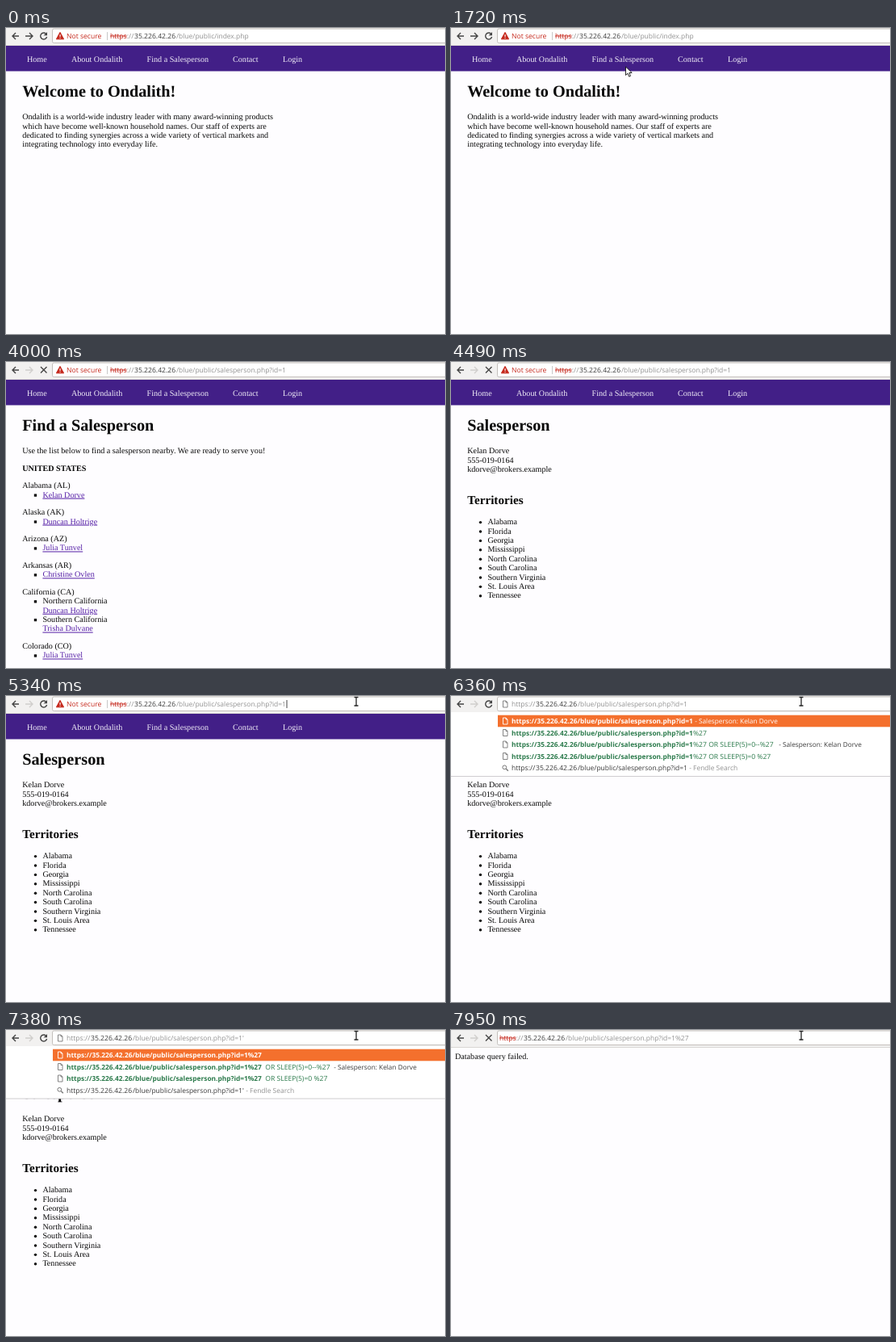
Write an HTML page that moves like this. It is 544 px wide and 379 px high and loops after 8000 ms.

```html
<!DOCTYPE html>
<html lang="en">
<head>
<meta charset="utf-8">
<title>Find a Salesperson</title>
<style>
  html, body { margin: 0; width: 100%; height: 100%; overflow: hidden; background: #fefdff; }
  svg { display: block; width: 544px; height: 379px; }
  text { white-space: pre; text-rendering: geometricPrecision; }
  .page text { font: 10.13px "Liberation Serif", serif; fill: #080808; }
  .page .h1 { font-size: 20.26px; font-weight: bold; }
  .page .h2 { font-size: 15.2px; font-weight: bold; }
  .page .bold { font-weight: bold; }
  .page .nav { fill: #f1edf8; }
  .page .link { fill: #551fa6; text-decoration: underline; }
  .ui text { font: 8.6px "Open Sans", "Noto Sans", sans-serif; fill: #3b3b3b; }
  .ui .path { font-size: 8.45px; }
  .ui .grey { fill: #929292; }
  .ui .red { fill: #c5281c; }
  .ui .struck { text-decoration: line-through; }
  .ui .match { font-weight: bold; font-size: 8.35px; }
  .ui .green { fill: #2b7a4b; }
  .ui .title { font-size: 8.25px; }
  .ui .white { fill: #fff; }
  .icon { fill: none; stroke: #444; stroke-width: 1.4; }
</style>
</head>
<body>
<svg id="stage" viewBox="0 0 544 379"></svg>
<script>
const LOOP = 8000;
const SCALE = 0.633;
const LINE = 18 * SCALE;
const GAP = 16 * SCALE;
const FIRST = 113.2;
const LEFT = 20.2;
const INDENT = 45.4;
const PERSON = 'Kelan Dorve';
const HOST = '35.226.42.26';
const FOLDER = '/blue/public/';
const QUERY = FOLDER + 'salesperson.php?id=1';

const text = (x, y, content, cls = '') => `<text x="${x}" y="${y}" class="${cls}">${content}</text>`;
const lines = (x, y, list) => list.map((s, i) => text(x, y + i * LINE, s)).join('');
const group = (id, content, cls = '') => `<g id="${id}" class="${cls}">${content}</g>`;
const rect = (x, y, w, h, fill) => `<rect x="${x}" y="${y}" width="${w}" height="${h}" fill="${fill}"/>`;

// Pages
const nav = rect(0, 22, 544, 31.5, '#421f87') + [
  [26, 'Home'], [81, 'About Ondalith'], [174.6, 'Find a Salesperson'], [281, 'Contact'], [343, 'Login']
].map(([x, label]) => text(x, 41.5, label, 'nav')).join('');

const homePage = nav + text(LEFT, 85, 'Welcome to Ondalith!', 'h1') + lines(LEFT, FIRST, [
  'Ondalith is a world-wide industry leader with many award-winning products',
  'which have become well-known household names. Our staff of experts are',
  'dedicated to finding synergies across a wide variety of vertical markets and',
  'integrating technology into everyday life.'
]);

// Entries: '*' starts a square bullet, '>' marks a link.
const territories = [
  ['Alabama (AL)', '*>' + PERSON],
  ['Alaska (AK)', '*>Duncan Holtrige'],
  ['Arizona (AZ)', '*>Julia Tunvel'],
  ['Arkansas (AR)', '*>Christine Ovlen'],
  ['California (CA)', '*Northern California', '>Duncan Holtrige', '*Southern California', '>Trisha Dulvane'],
  ['Colorado (CO)', '*>Julia Tunvel']
];

function listPage() {
  let y = FIRST;
  let out = nav + text(LEFT, 85, 'Find a Salesperson', 'h1') +
    text(LEFT, y, 'Use the list below to find a salesperson nearby. We are ready to serve you!');
  y += LINE + GAP;
  out += text(LEFT, y, 'UNITED STATES', 'bold');
  for (const [state, ...entries] of territories) {
    y += LINE + GAP;
    out += text(LEFT, y, state);
    for (const entry of entries) {
      y += LINE;
      if (entry[0] === '*') out += rect(34.8, y - 4.2, 3.3, 3.3, '#080808');
      out += text(INDENT, y, entry.replace(/^[*>]+/, ''), entry.includes('>') ? 'link' : '');
    }
  }
  return out;
}

const areas = ['Alabama', 'Florida', 'Georgia', 'Mississippi', 'North Carolina', 'South Carolina',
  'Southern Virginia', 'St. Louis Area', 'Tennessee'];
const personPage = nav + text(LEFT, 85, 'Salesperson', 'h1') +
  lines(LEFT, FIRST, [PERSON, '555-019-0164', 'kdorve@brokers.example']) +
  text(LEFT, 176, 'Territories', 'h2') + lines(INDENT, 201.3, areas) +
  areas.map((_, i) => `<circle cx="36.5" cy="${198.6 + i * LINE}" r="1.7" fill="#080808"/>`).join('');

// Toolbar
const toolbar = rect(0, 0, 544, 22, '#f2f1f0') + rect(0, 21, 544, 1, '#d9d6d4') +
  '<rect x="57.5" y="1" width="500" height="17.5" rx="2" fill="#fff" stroke="#c3bfbb"/>' +
  '<path class="icon" d="M16 10H8M12 6L8 10L12 14"/>' +
  '<path id="forward" class="icon" d="M24 10H33M29 6L33 10L29 14"/>' +
  group('reload', '<path class="icon" d="M49.6 7.2A4 4 0 1 0 50.6 11"/><path d="M51 5V9.3H46.7Z" fill="#444"/>') +
  group('stop', '<path class="icon" d="M43 6L50.5 13.5M50.5 6L43 13.5"/>');

const address = (x, path, struck) =>
  (struck ? text(x, 13, 'https', 'red struck') + text(x + 20.7, 13, '://', 'grey')
          : text(x, 13, 'https://', 'grey')) +
  text(x + 30, 13, HOST) + text(x + 82, 13, path, 'grey path');

const docIcon = (y, color = '#777') =>
  `<path d="M64.5 ${y - 4}h3.5l2 2v6h-5.5zM68 ${y - 4}v2h2" fill="none" stroke="${color}" stroke-width=".9"/>`;
const warning = '<path d="M67 5.3L71.6 13.8H62.4Z" fill="#c5281c" stroke="#c5281c" stroke-linejoin="round"/>' +
  rect(66.5, 8, 1.1, 3, '#fff') + rect(66.5, 11.8, 1.1, 1.1, '#fff') +
  text(75, 13, 'Not secure', 'red') + rect(125, 5, 0.8, 10, '#bbb');

const insecure = file => warning + address(129, FOLDER + file, true);
const addresses = {
  home: insecure('index.php'),
  list: insecure('territories.php'),
  person: insecure('salesperson.php?id=1'),
  typed: docIcon(10) + address(75, QUERY),
  quoted: docIcon(10) + address(75, QUERY + "'"),
  failed: address(60, QUERY + '%27', true)
};

// Suggestions
const MATCH = 'https://' + HOST + QUERY;
const rowY = i => 31 + i * 14.5;
const baseline = i => rowY(i) + 3.1;
const chosen = (match, extra = '') => rect(58, 23.7, 486, 14.6, '#f4702d') + docIcon(rowY(0), '#fff') +
  text(75, baseline(0), match, 'match white') + text(300, baseline(0), extra, 'title white');
const suggestion = (i, match, restX, rest, extra = '') => docIcon(rowY(i)) +
  text(75, baseline(i), match, 'match green') + text(restX, baseline(i), rest, 'green') +
  text(404, baseline(i), extra, 'title');
const search = (i, query, x) =>
  `<path d="M68.3 ${rowY(i) + 1.3}l2.5 2.5" stroke="#777" stroke-width="1.4"/>` +
  `<circle cx="66.3" cy="${rowY(i) - 0.7}" r="2.4" fill="none" stroke="#777"/>` +
  text(75, baseline(i), 'https://') + text(105, baseline(i), HOST) +
  text(157, baseline(i), query, 'path') + text(x, baseline(i), ' - Fendle Search', 'path grey');
const owner = ' - Salesperson: ' + PERSON;

const popups = {
  typed: chosen(MATCH, owner) + suggestion(1, MATCH, 300, '%27') +
    suggestion(2, MATCH, 300, '%27 OR SLEEP(5)=0--%27', owner) +
    suggestion(3, MATCH, 300, '%27 OR SLEEP(5)=0 %27') + search(4, QUERY, 293),
  quoted: chosen(MATCH + '%27') +
    suggestion(1, MATCH + '%27', 319, ' OR SLEEP(5)=0--%27', owner) +
    suggestion(2, MATCH + '%27', 319, ' OR SLEEP(5)=0 %27') + search(3, QUERY + "'", 295)
};

// Pointers, each with its hot spot at 0,0
const pointers = {
  arrow: '<path d="M0 0V10.5L2.5 8.2L4.2 12.2L6 11.4L4.3 7.5H7.7Z" fill="#fff" stroke="#111" stroke-width=".9"/>',
  hand: '<path d="M-1 0.8Q0 -.6 1 .8V5L5.5 6V10L4.5 13H-1.5L-4.5 8.5L-3.5 7.5L-1 9Z" fill="#fff" stroke="#111" stroke-width=".9"/>',
  beam: '<path d="M-2.5 -5.5H2.5M0 -5.5V5M-2.5 5H2.5" fill="none" stroke="#fff" stroke-width="2.6"/>' +
    '<path d="M-2.5 -5.5H2.5M0 -5.5V5M-2.5 5H2.5" fill="none" stroke="#222" stroke-width="1.3"/>'
};

const pages = { home: homePage, list: listPage(), person: personPage, failed: text(5, 36, 'Database query failed.') };
const family = (prefix, parts) => Object.entries(parts).map(([k, v]) => group(prefix + k, v)).join('');
const stage = document.getElementById('stage');
stage.innerHTML = rect(0, 0, 544, 379, '#fefdff') +
  group('pages', family('page-', pages), 'page') +
  group('ui', toolbar + family('url-', addresses) +
    group('popup', '<rect id="sheet" y="20" width="544" fill="#fff"/><rect id="edge" width="544" height="1" fill="#cfcdd0"/>' +
      family('popup-', popups)) +
    '<rect id="caret" y="5" width="1" height="10" fill="#444"/>', 'ui') +
  group('pointer', family('pointer-', pointers));

// Timeline: [start in ms, value]
const steps = {
  page: [[0, 'home'], [2620, 'list'], [4180, 'person'], [7950, 'failed']],
  url: [[0, 'home'], [1960, 'list'], [3700, 'person'], [5400, 'typed'], [6620, 'quoted'], [7710, 'failed']],
  popup: [[0, ''], [5400, 'typed'], [6620, 'quoted'], [7710, '']],
  button: [[0, 'reload'], [1960, 'stop'], [2740, 'reload'], [3700, 'stop'], [4550, 'reload'], [7710, 'stop']],
  caret: [[0, 0], [5340, 347.5], [5400, 293.5], [5710, 0], [6040, 293.5], [6360, 0],
    [6620, 295.5], [6940, 0], [7060, 295.5], [7380, 0], [7710, 0]],
  pointer: [[0, ''], [860, 'arrow'], [1780, 'hand'], [2740, 'arrow'], [3340, 'hand'], [3760, 'arrow'], [4000, ''], [4750, 'beam']]
};
const path = [[860, 307, 229], [1160, 190, 95], [1340, 128, 38], [1520, 214, 53], [1660, 214, 53],
  [1720, 216.5, 48], [1900, 213, 39], [2140, 211, 40], [2560, 211, 40], [3000, 130, 125], [3400, 74, 163],
  [3640, 73, 164], [3940, 447, -14], [4690, 434, -8], [4750, 434, -2], [4940, 434, 7], [LOOP, 434, 7]];

const at = (list, t) => list.findLast(([start]) => start <= t)[1];
const el = id => document.getElementById(id);
const show = (id, on) => { el(id).style.display = on ? '' : 'none'; };
const pick = (prefix, parts, key) => Object.keys(parts).forEach(k => show(prefix + k, k === key));

function pointerAt(t) {
  const time = Math.floor(t / 20) * 20;
  const next = path.findIndex(p => p[0] > time);
  if (next < 1) return path[0].slice(1);
  const [t0, x0, y0] = path[next - 1], [t1, x1, y1] = path[next];
  const k = (time - t0) / (t1 - t0);
  return [x0 + (x1 - x0) * k, y0 + (y1 - y0) * k];
}

function render(t) {
  pick('page-', pages, at(steps.page, t));
  pick('url-', addresses, at(steps.url, t));
  const popup = at(steps.popup, t);
  show('popup', popup);
  pick('popup-', popups, popup);
  const shrink = Math.min(4, Math.max(0, Math.floor((t - 6940) / 60) + 1)) / 4;
  const bottom = 99.5 - 14.5 * shrink;
  el('sheet').setAttribute('height', bottom - 20);
  el('edge').setAttribute('y', bottom - 0.5);

  const button = at(steps.button, t);
  show('reload', button === 'reload');
  show('stop', button === 'stop');
  el('forward').style.stroke = t < 2380 ? '#444' : '#d0cecc';
  const caret = at(steps.caret, t);
  show('caret', caret);
  el('caret').setAttribute('x', caret);

  pick('pointer-', pointers, at(steps.pointer, t));
  el('pointer').setAttribute('transform', `translate(${pointerAt(t)})`);
}

const begin = performance.now();
function tick() {
  render((performance.now() - begin) % LOOP);
  requestAnimationFrame(tick);
}
tick();
</script>
</body>
</html>
```
